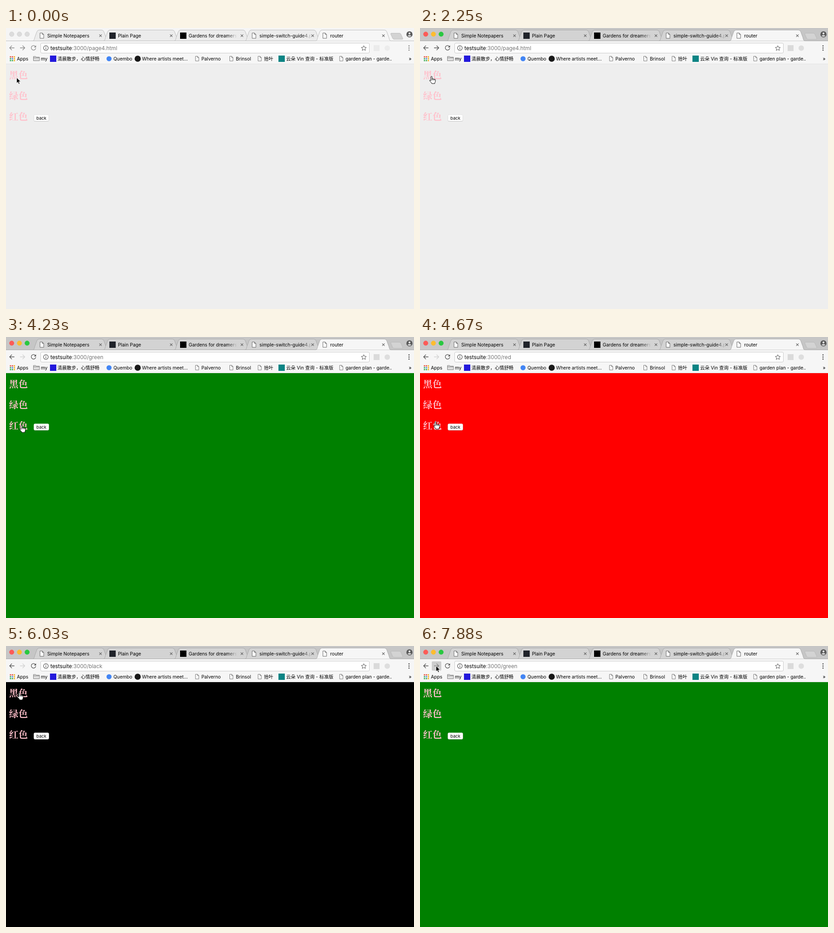
Animation of 900x622 px, one loop 8 s. Source, as an HTML page:

```html
<!DOCTYPE html>
<html lang="zh-CN">
<head>
<meta charset="utf-8">
<title>router</title>
<style>
  html, body { margin: 0; width: 100%; height: 100%; overflow: hidden; }
  svg { display: block; width: 900px; height: 622px; --strip: #c6c6c6; --tab: #d3d3d3; --edge: #a9a9a9; --ink: #555; }
  svg.idle { --strip: #f5f5f5; --tab: #ececec; --edge: #bdbdbd; --ink: #8b8b8b; }
  text { font: 10.3px Inter, "Noto Sans CJK SC", "Noto Sans CJK", sans-serif; fill: #000; white-space: pre; }
  .url { font-size: 11.8px; }
  .url .path { fill: #757575; }
  .link { font: bold 20.6px "Noto Serif CJK SC", "Noto Sans CJK SC", "Noto Sans CJK", serif; fill: pink; }
  .button { font-size: 9.5px; text-anchor: middle; }
  .strip { fill: var(--strip); }
  .tab { fill: var(--tab); stroke: var(--edge); }
  .line { fill: none; stroke: var(--ink); stroke-width: 1.3; }
  .solid { fill: var(--ink); }
  .doc { fill: #fafafa; stroke: #5a5a5a; stroke-width: .9; }
  .close { stroke: #5c5c5c; stroke-width: 1.1; }
  .hover { fill: #cdcdcd; }
  .idle .light { fill: #dcdcdc; stroke: #cacaca; }
  .idle .extension { opacity: .4; }
</style>
</head>
<body>
<svg id="stage" viewBox="0 0 900 622">
  <defs>
    <linearGradient id="fade">
      <stop offset=".8" stop-color="#000"/>
      <stop offset="1" stop-color="#000" stop-opacity="0"/>
    </linearGradient>
    <path id="doc" class="doc" d="M0 0h5l3.2 3.2v8.6H0zM5 0v3.2h3.2"/>
    <path id="close" class="close" d="M-2.7-2.7 2.7 2.7M2.7-2.7-2.7 2.7"/>
  </defs>

  <rect id="page" y="79" width="900" height="543"/>
  <g id="links"></g>
  <rect x="61.5" y="192.8" width="33" height="14" rx="2.5" fill="#bcbcbc"/>
  <rect x="61.5" y="192" width="33" height="14" rx="2.5" fill="#fff" stroke="#d0d0d0" stroke-width=".5"/>
  <text class="button" x="78" y="202.6">back</text>

  <rect class="strip" width="900" height="29"/>
  <g id="lights" stroke-width=".6"></g>
  <path d="M850 11.5h18q2 0 3 2l4 9q1 2.5-1 2.5h-18q-2 0-3-2l-4-9q-1-2.5 1-2.5z" fill="#d3d3d3" stroke="#b5b5b5" stroke-width=".8"/>
  <circle cx="890" cy="14" r="6.8" fill="#5a5a5a"/>
  <path d="M885.700 17.500q4.300-4 8.600 0-4.300 3.600-8.600 0z" fill="#ddd"/>
  <circle cx="890" cy="12" r="2.2" fill="#ddd"/>
  <g id="tabs"></g>

  <rect id="hover" class="hover" y="34" width="21" height="20.5" rx="2"/>
  <path class="line" d="M18.500 44H8M13 39l-5 5 5 5"/>
  <path id="forward" class="line" d="M31 44h10.500M36.500 39l5 5-5 5"/>
  <path class="line" d="M65 41.200a5 5 0 1 0 .7 3.500"/>
  <path class="solid" d="M66.300 38.500v4.600h-4.600z"/>
  <rect x="76.5" y="33.5" width="725" height="22" rx="2.5" fill="#fff" stroke="#c9c9c9"/>
  <circle cx="88" cy="44.3" r="5.2" fill="none" stroke="#555" stroke-width="1.2"/>
  <path d="M88 43.500v3.800M88 41v1.400" stroke="#555" stroke-width="1.3"/>
  <text class="url" x="98" y="48.6">testsuite<tspan class="path" id="path"></tspan></text>
  <path d="M789.300 39l1.600 3.700 4 .4-3 2.700.9 3.900-3.500-2.100-3.500 2.100.9-3.900-3-2.700 4-.4z" fill="none" stroke="#555"/>
  <rect class="extension" x="811" y="38" width="13" height="13" fill="#dadada"/>
  <circle class="extension" cx="841" cy="44.5" r="6" fill="#dedede"/>
  <g class="solid"><circle cx="889" cy="39.7" r="1.4"/><circle cx="889" cy="44.3" r="1.4"/><circle cx="889" cy="48.9" r="1.4"/></g>

  <g id="bookmarks"></g>
  <path d="M60.500 72.500v-9.500h5l1.300 1.500h7v8zM60.500 66h13.300" fill="#ddd" stroke="#777" stroke-width=".9"/>
  <path id="cursor" stroke-linejoin="round"/>
</svg>

<script>
const $ = id => document.getElementById(id);
const label = (x, y, words, attrs = '') => `<text x="${x}" y="${y}" ${attrs}>${words}</text>`;
const doc = (x, y, scale = 1) => `<use href="#doc" transform="translate(${x} ${y}) scale(${scale})"/>`;
const square = (x, y, size, color) => `<rect x="${x}" y="${y}" width="${size}" height="${size}" fill="${color}"/>`;
const disc = (x, y, r, color) => `<circle cx="${x}" cy="${y}" r="${r}" fill="${color}"/>`;

$('links').innerHTML = ['黑色', '绿色', '红色']
  .map((word, i) => label(6.8, 111.8 + 46 * i, word, 'class="link"')).join('');

$('lights').innerHTML = ['#fc5b57', '#fdbc2f', '#29c840']
  .map((color, i) => `<circle class="light" cx="${12.6 + 17 * i}" cy="13.7" r="5.1" fill="${color}" stroke="${color}"/>`).join('');

function tab(title, i, tabs) {
  const x = 58 + 156 * i;
  const active = i === tabs.length - 1;
  const icon = i === 1 ? square(x + 14, 10, 14, '#20232a')
    : i === 2 ? square(x + 14, 10, 14, '#000') : doc(x + 17, 11);
  const fade = i === 2 || i === 3 ? 'style="fill:url(#fade)"' : '';
  const toolbar = active
    ? '<rect y="28" width="900" height="51.5" fill="#f6f6f6"/><path d="M0 28.500h900" style="stroke:var(--edge)"/><path d="M0 79.500h900" stroke="#e4e4e4"/>' : '';
  return `${toolbar}<path class="tab" ${active ? 'style="fill:#f6f6f6"' : ''}
    d="M${x} 28.500c5 0 4-4 6-9l4-11q1.500-4 5-4h138q3.500 0 5 4l4 11c2 5 1 9 6 9"/>
    ${icon}${label(x + 33, 20.6, title, fade)}<use href="#close" x="${x + 150.5}" y="17"/>`;
}
$('tabs').innerHTML = ['Simple Notepapers', 'Plain Page', 'Gardens for dreamers', 'simple-switch-guide4.p', 'router']
  .map(tab).join('');

const dotColors = ['#e5493a', '#e5493a', '#f2b01e', '#35a853', '#4285f4', '#f2b01e', '#35a853', '#35a853', '#f2b01e'];
const bookmarkIcons = [
  ...dotColors.map((color, i) => square(8.5 + i % 3 * 4.3, 62.5 + Math.floor(i / 3) * 4.1, 2.8, color)),
  square(97, 61, 14, '#2319dc'), disc(227.3, 68, 5.6, '#4285f4'),
  disc(290.5, 68, 6.8, '#181818'), square(601, 61, 14, '#0c8484'),
  ...[418, 493.5, 556, 736].map(x => doc(x, 62.6, .88)),
];
const bookmarkNames = [
  [24, 'Apps'], [77, 'my'], [113.5, '清晨散步，心情舒畅'], [237, 'Quembo'],
  [300, 'Where artists meet...'], [431, 'Palverno'], [507, 'Brinsol'], [569, '拾叶'],
  [618, '云朵 Vin 查询 - 标准版'], [749, 'garden plan - garde..'], [888.5, '»'],
];
$('bookmarks').innerHTML = bookmarkIcons.join('') +
  bookmarkNames.map(([x, name]) => label(x, 71.8, name)).join('');

const cursors = {
  arrow: { d: 'M0 0V12.200l2.800-2.600 1.900 4.500 2.100-.9-1.900-4.400h3.900z', fill: '#000', stroke: '#fff', 'stroke-width': .8 },
  hand: {
    d: 'M-1.500 9.500V1.200a1.400 1.400 0 0 1 2.800 0V5.500q1.400-1.200 2.600.3 1.500-.9 2.400.5 1.900-.6 2.100 1.200v3q0 2-1.300 3.800v1.500H.6q-1-2.500-3.200-4.200-2.300-2.300-1.600-3.200 1.200-.8 2.700 1.100zM1.300 5.500v3M3.900 6v2.500M6.300 6.500v2',
    fill: '#fff', stroke: '#000', 'stroke-width': 1 },
};

const pages = [
  [0, '#eee', 'page4.html'], [2540, '#000', 'black'], [3580, 'green', 'green'], [4520, 'red', 'red'],
  [5260, 'green', 'green'], [5880, '#000', 'black'], [6920, 'green', 'green'],
];
const pointer = [
  [0, 'arrow', 23.5, 110], [150, 'hand', 25.5, 106.6], [2100, 'hand', 25, 107], [2250, 'hand', 25.5, 107.2],
  [2840, 'hand', 26, 118], [2990, 'hand', 28, 138], [3130, 'hand', 28.7, 148],
  [3730, 'hand', 29, 152], [3880, 'hand', 31, 168], [4080, 'hand', 33.5, 188], [4230, 'hand', 34.5, 195.4],
  [4670, 'hand', 34.5, 188], [4810, 'hand', 34, 165], [4960, 'hand', 34, 150.5],
  [5410, 'hand', 32, 128], [5590, 'hand', 30, 104.5], [6030, 'hand', 29.5, 103.5],
  [6180, 'hand', 28, 97], [6330, 'arrow', 24, 82], [6480, 'arrow', 18, 61], [6620, 'arrow', 14, 48],
  [6770, 'arrow', 13, 45.5], [7220, 'arrow', 28, 46], [7430, 'arrow', 35.4, 44.2],
];
const current = (steps, time) => steps.findLast(([start]) => start <= time);

function set(id, attrs) {
  for (const name in attrs) $(id).setAttribute(name, attrs[name]);
}

function render(time) {
  const [, color, path] = current(pages, time);
  const [, shape, x, y] = current(pointer, time);
  const overButton = shape === 'arrow' && y < 55;
  const canForward = time < 2540 || time >= 6920;

  set('stage', { class: time < 1500 ? 'idle' : '' });
  set('page', { fill: color });
  $('path').textContent = ':3000/' + path;
  set('hover', { x: x < 25 ? 3 : 26, visibility: overButton ? 'visible' : 'hidden' });
  $('forward').style.stroke = !canForward ? '#d2d2d2' : time >= 7880 ? '#858585' : '';
  set('cursor', { ...cursors[shape], transform: `translate(${x} ${y})` });
}

function tick() {
  render(performance.now() % 8000);
  requestAnimationFrame(tick);
}
tick();
</script>
</body>
</html>
```
